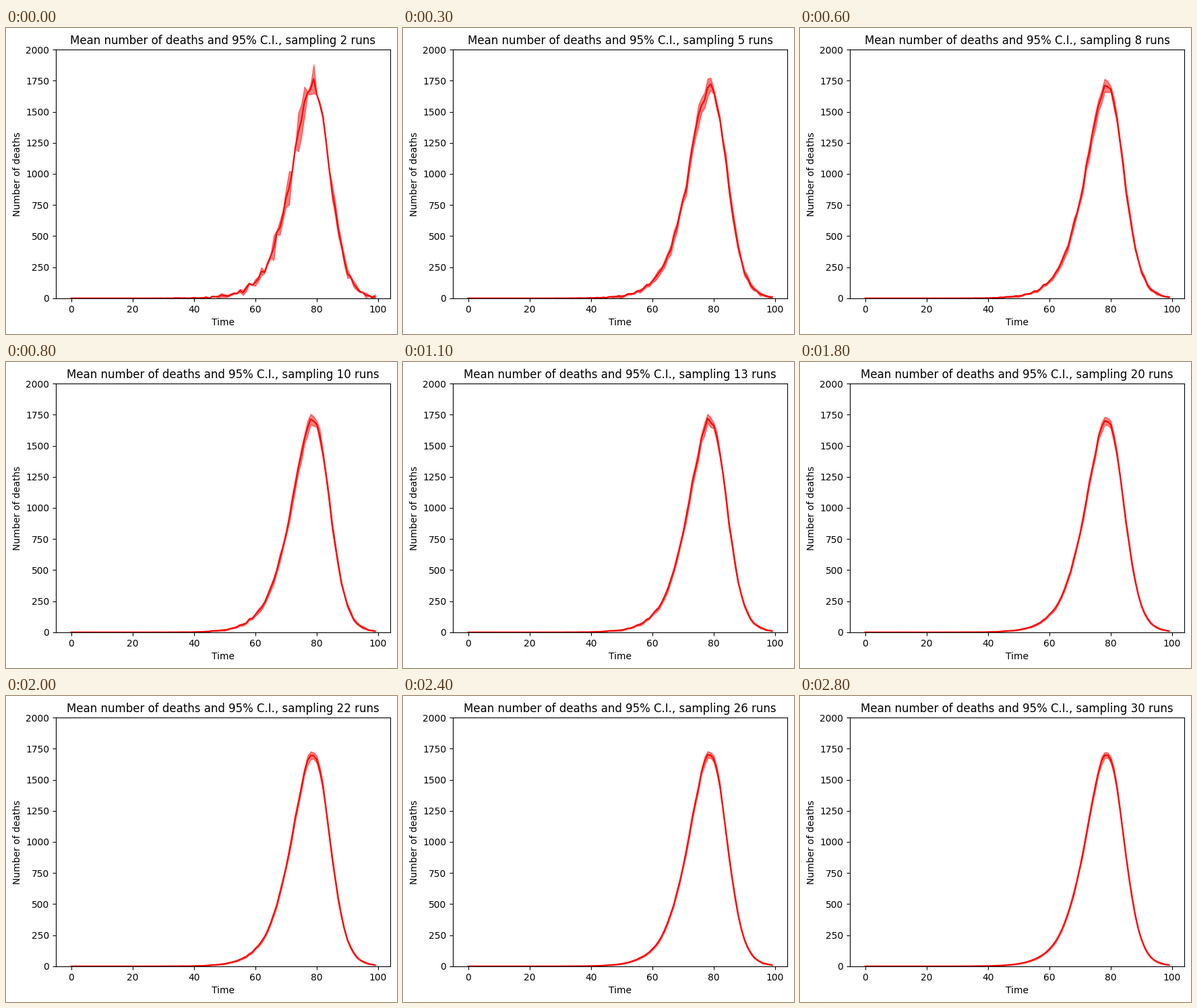
A matplotlib script that plays this animation: 580 px wide and 455 px high, repeating every 2.9 s.

```python
import numpy as np
import matplotlib.pyplot as plt
from matplotlib.animation import FuncAnimation

W, H, DPI = 580, 455, 100
STEP_MS = 100
RUNS = 30
T = np.arange(100)

# Expected deaths every GAP time units, from START on
START, GAP = 46, 4
KEYS = [9, 20, 45, 95, 199, 420, 800, 1325, 1697, 1442, 702, 215, 52, 14, 4]


def spline(t, values):
    """Smooth curve through evenly spaced values (cubic Hermite)."""
    slopes = np.gradient(values)
    pos = (t - START) / GAP
    i = np.clip(pos.astype(int), 0, len(values) - 2)
    u = pos - i
    rise = u * u * (3 - 2 * u)
    return (values[i] + rise * (values[i + 1] - values[i])
            + u * (1 - u) ** 2 * slopes[i]
            - u * u * (1 - u) * slopes[i + 1])


# Exponential onset, then the outbreak, smooth on a log scale
onset = KEYS[1] * np.exp((T - 50) / 5)
outbreak = np.exp(spline(np.maximum(T, START), np.log(KEYS)))
expected = np.where(T < 50, onset, outbreak)

# Runs scatter around the expected curve and balance out over the full set
rng = np.random.default_rng(7)
noise = rng.normal(0, 1.85, (RUNS, T.size)) * np.sqrt(expected)
runs = expected + noise - noise.mean(axis=0)

fig = plt.figure(figsize=(W / DPI, H / DPI), dpi=DPI, facecolor="white")
ax = fig.add_axes([74 / W, 53.2 / H, 496 / W, 369.6 / H])
ax.set(xlim=(-4.95, 103.95), ylim=(0, 2000),
       xticks=range(0, 101, 20), yticks=range(0, 2001, 250),
       xlabel="Time", ylabel="Number of deaths")
title = ax.set_title("")
band = ax.fill_between(T, expected, expected, color="red", alpha=0.5)
line, = ax.plot(T, expected, color="red")


def draw(i):
    n = i + 2
    sample = runs[:n]
    mean = np.maximum(sample.mean(axis=0), 0)
    half = 1.96 * sample.std(axis=0, ddof=1) / np.sqrt(n)
    line.set_ydata(mean)
    upper = np.column_stack([T, mean + half])
    lower = np.column_stack([T, mean - half])
    band.set_verts([np.concatenate([upper, lower[::-1]])])
    title.set_text("Mean number of deaths and 95% C.I., "
                   f"sampling {n} runs")
    return line, band, title


anim = FuncAnimation(fig, draw, frames=RUNS - 1, interval=STEP_MS,
                     repeat=True, repeat_delay=0, blit=False)
plt.show()
```
